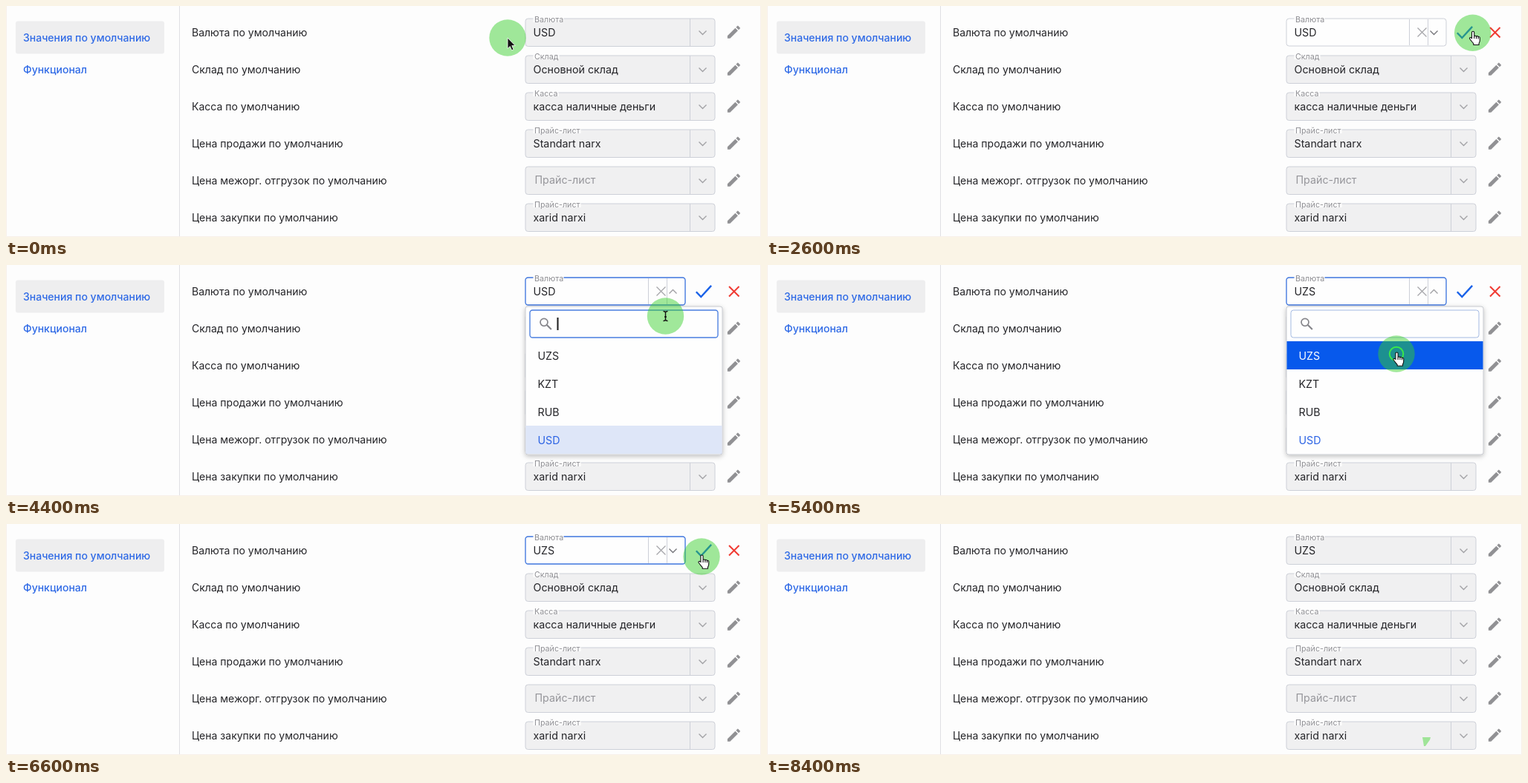
Recreate the animation shown at these times as an HTML page. Size 1016 px wide and 312 px high, loop 8600 ms.

```html
<!DOCTYPE html>
<html lang="ru">
<head>
<meta charset="utf-8">
<title>Значения по умолчанию</title>
<style>
html, body { margin: 0; width: 100%; height: 100%; overflow: hidden; background: #fdfdfd; }
svg { display: block; width: 1016px; height: 312px; font: 14.03px Inter, sans-serif; fill: none; }
text { fill: #242428; }
.nav { font-weight: 500; fill: #2f6ae6; }
.tag { font-size: 10.7px; fill: #8d8d92; }
.value { font-size: 14.25px; }
.hint { font-size: 14.25px; fill: #95959a; }
.line { stroke: #cdd0d8; }
.off { fill: #f0f0f1; }
.on { fill: #fefefe; }
.arrow { stroke: #a2a2a6; stroke-width: 1.4; }
.blue { fill: #2a62e4; }
</style>
</head>
<body>
<svg id="stage" viewBox="0 0 1016 312" xmlns="http://www.w3.org/2000/svg"></svg>
<script>
const LOOP = 8600, STEP = 200;
const stage = document.getElementById('stage');

const text = (x, y, s, cls = '', id = '') => `<text x="${x}" y="${y}" class="${cls}" id="${id}">${s}</text>`;
const box = (x, y, w, h, attrs) => `<rect x="${x}" y="${y}" width="${w}" height="${h}" ${attrs}/>`;
const path = (d, attrs) => `<path d="${d}" ${attrs}/>`;
const group = (id, body) => `<g id="${id}">${body}</g>`;

const rows = [
  ['Валюта по умолчанию', 'Валюта', 'USD'],
  ['Склад по умолчанию', 'Склад', 'Основной склад'],
  ['Касса по умолчанию', 'Касса', 'касса наличные деньги'],
  ['Цена продажи по умолчанию', 'Прайс-лист', 'Standart narx'],
  ['Цена межорг. отгрузок по умолчанию', 'Прайс-лист', ''],
  ['Цена закупки по умолчанию', 'Прайс-лист', 'xarid narxi']
];
const tagWidth = { 'Валюта': 41, 'Склад': 35, 'Касса': 34, 'Прайс-лист': 64 };

const tag = (y, s) => box(709.5, y - 23, tagWidth[s], 9, 'fill="#fdfdfd"') + text(711, y - 14.3, s, 'tag');
const pencil = y => path('M3 17.25V21h3.75L17.81 9.94l-3.75-3.75zM20.71 7.04a1 1 0 0 0 0-1.41l-2.34-2.34a1 1 0 0 0-1.41 0l-1.83 1.83 3.75 3.75z',
  `fill="#919194" transform="translate(968 ${y - 12.2})scale(.95)"`);

const lockedField = y =>
  box(699, y - 19, 255, 37.5, 'rx="3.5" class="off line"') +
  path(`M920.5 ${y - 19}v37.5`, 'class="line"') +
  path(`M932.5 ${y - 2.5}l5 5 5-5`, 'class="arrow"') + pencil(y);

const row = ([name, label, value], i) => {
  const y = 36 + 50 * i;
  const field = lockedField(y);
  return text(250, y + 5, name) + (i ? field : group('locked', field) + group('edit', editField())) +
    (value ? tag(y, label) + text(709.5, y + 4.6, value, 'value', i ? '' : 'value') : text(711.5, y + 4, label, 'hint'));
};

const editField = () =>
  box(699, 17, 215, 37, 'rx="3.5" class="on line" id="frame"') +
  path('M864.5 18v35M889.5 18v35', 'class="line"') +
  path('M875.5 29.5l12 12M887.5 29.5l-12 12', 'stroke="#a6a6aa" stroke-width="1.3"') +
  path('', 'id="chevron" stroke-width="1.4"') +
  path('M928.8 36.2l6.5 6.9 13.8-15.2', 'stroke="#1a62e8" stroke-width="2.4"') +
  path('M973 29l13.5 13.5M986.5 29L973 42.5', 'stroke="#f03a32" stroke-width="2"');

const menu = () =>
  box(699, 56, 265, 200, 'rx="3" fill="#fefefe" stroke="#c6c8ce" filter="url(#shade)"') +
  box(705, 61, 253, 37, 'rx="3.5" id="search"') +
  '<circle cx="724" cy="77.3" r="5" stroke="#85858a" stroke-width="1.7"/>' +
  path('M727.8 81.1l6 6', 'stroke="#85858a" stroke-width="2.1"') +
  path('M742.5 71v17', 'stroke="#222" stroke-width="2.1" id="caret"') +
  box(699.5, 217, 264, 38, 'fill="#dee6f8" id="picked"') +
  box(699.5, 103, 264, 38, 'fill="#0759ec" id="hover"') +
  ['UZS', 'KZT', 'RUB', 'USD'].map((s, i) =>
    text(715.5, 127.9 + 38 * i, s, i === 3 ? 'value blue' : 'value', 'item' + i)).join('');

const pointer = () =>
  '<circle r="24.7" fill="rgba(53,206,42,.47)"/>' +
  '<circle r="19" fill="rgba(40,175,40,.35)" id="press"/>' +
  '<circle id="ring" stroke="#3be84a" stroke-width="2"/>' +
  path('M0 0V14.5L3.3 11.5 5.6 16.8 8 15.8 5.8 10.6H10.2Z', 'id="arrow" fill="#111" stroke="#fff" stroke-width=".8"') +
  path('M-1.8 9V1.3a1.6 1.6 0 0 1 3.2 0V6.4c.6-1 2.4-.9 2.8.2.7-.8 2.3-.6 2.6.6.9-.6 2.2 0 2.2 1.4V12c0 2-.9 2.8-1.3 4.2V18H.5v-1.6C-.8 14.6-3 12.3-4.6 10c-.9-1.5.9-2.5 1.9-1.5zM1.4 6.4v3.2M4.2 6.8v3M6.8 7.4v2.6',
    'id="hand" fill="#fff" stroke="#111" stroke-width="1.1" transform="translate(.7 -1.7)"') +
  path('M-3-6.5q3 0 3 2 0-2 3-2M0-4.5v9M-3 6.5q3 0 3-2 0 2 3 2M-1.5 1h3', 'id="beam" stroke="#111" stroke-width="1.4"');

stage.innerHTML =
  '<defs><filter id="shade" x="-10%" y="-10%" width="120%" height="125%">' +
  '<feDropShadow dx="0" dy="2" stdDeviation="3" flood-color="#000" flood-opacity=".25"/></filter></defs>' +
  box(0, 0, 1016, 312, 'fill="#fdfdfd"') +
  path('M.5 0V311.5H1015.5V0', 'stroke="#f8f0e9"') +
  box(13, 20.5, 200, 44, 'rx="3" fill="#eeeeef"') +
  text(23, 47.5, 'Значения по умолчанию', 'nav') + text(23, 91.2, 'Функционал', 'nav') +
  path('M233.5 0v311', 'stroke="#e0e0e4"') +
  rows.map(row).join('') + group('menu', menu()) +
  path('M882 288h11l-1 3.5-6 8.5h-2z', 'fill="#9fe498" id="tail"') + group('pointer', pointer());

const $ = id => document.getElementById(id);
const show = (id, on) => $(id).setAttribute('display', on ? 'inline' : 'none');
const set = (id, attrs) => { for (const k in attrs) $(id).setAttribute(k, attrs[k]); };

// Pointer stops: time, x, y
const stops = [
  [0, 675, 43], [400, 980.5, 36], [2300, 980.5, 36], [3000, 902, 36.5], [3800, 902, 36.5],
  [4400, 887.5, 69], [4600, 887.5, 69], [5200, 847, 120], [5800, 847, 120], [6500, 936, 44],
  [7700, 936, 44], [8300, 888, 264], [LOOP, 888, 264]
];
const clicks = [1150, 3245, 5250, 7050];

function place(t) {
  const i = stops.findIndex((s, n) => n && t < s[0]);
  const [t0, x0, y0] = stops[i - 1], [t1, x1, y1] = stops[i];
  const u = (t - t0) / (t1 - t0), e = u * u * (3 - 2 * u);
  return [x0 + (x1 - x0) * e, y0 + (y1 - y0) * e];
}

function render(t) {
  const [x, y] = place(t);
  const within = (a, b) => t >= a && t < b;
  const editing = within(1400, 7400), open = within(3800, 5600);
  const focus = within(3400, 7400), chosen = t >= 5400;

  show('locked', !editing);
  show('edit', editing);
  $('value').textContent = chosen ? 'UZS' : 'USD';
  $('frame').style.stroke = focus ? '#3f76de' : '';
  $('frame').style.strokeWidth = focus ? 1.35 : 1;
  const raised = within(3600, 5600);
  set('chevron', {
    d: raised ? 'M892.5 38.5l5-5 5 5' : 'M892.5 33.5l5 5 5-5',
    stroke: raised ? '#a0a0a4' : '#77777c'
  });

  show('menu', open);
  const hover = within(5000, 5600);
  show('hover', hover);
  show('picked', !hover);
  show('caret', within(3800, 5400) && (t - 3800) % 1200 < 800);
  set('search', { stroke: chosen ? '#a3b9e2' : '#4a7edf', 'stroke-width': chosen ? 1 : 1.35 });
  $('item0').style.fill = hover ? '#fff' : '';

  const beam = within(4200, 4900), arrow = t < 300 || t >= 7800;
  set('pointer', { transform: `translate(${x} ${y})` });
  show('pointer', t < 8400);
  show('tail', t >= 8400);
  show('arrow', arrow);
  show('beam', beam);
  show('hand', !arrow && !beam);

  const age = t - (clicks.find(c => t >= c && t < c + 650) ?? -LOOP);
  const r = age < 650 ? 62 * age / 1000 : 0;
  set('ring', { r, opacity: r > 24 ? .6 : 1 });
  show('ring', r > 0);
  set('press', { opacity: Math.min(1, Math.max(0, (r - 20) / 8)) });
  show('press', r > 20 && r < 32);
}

function tick(now) {
  render(Math.floor(now % LOOP / STEP) * STEP);
  requestAnimationFrame(tick);
}
render(0);
requestAnimationFrame(tick);
</script>
</body>
</html>
```
